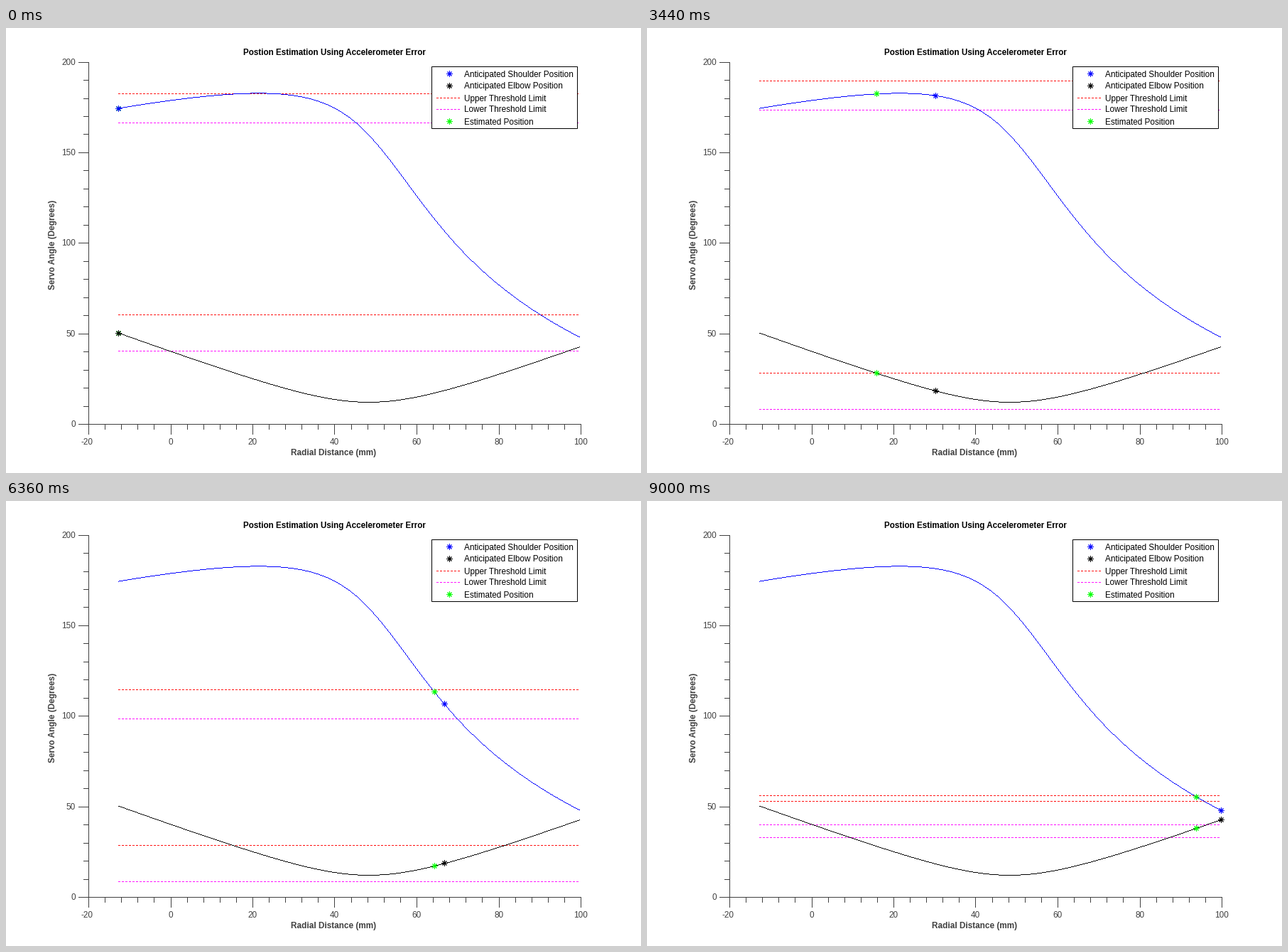
Write a matplotlib script that moves like this. It is 894 by 626 pixels and loops after 9.04 s.

```python
import numpy as np
import matplotlib.pyplot as plt
from matplotlib.animation import FuncAnimation
from matplotlib.patches import Rectangle

W, H, DPI = 894, 626, 64
PX = 72 / DPI  # points per pixel
FRAMES, INTERVAL = 226, 40
X0, Y0 = 116, 557
GREY = "#404040"
BLUE, RED, MAGENTA, GREEN = "#0000ff", "#ff0000", "#ff00ff", "#00ff00"

plt.rcParams["font.family"] = "Liberation Sans"


def px(mm):
    return X0 + (mm + 20) * 5.775


def py(deg):
    return Y0 - deg * 2.547


def shoulder_angle(mm, upper=62, fore=80, height=24.1):
    """Two-link arm: direction to the hand plus the inner shoulder angle."""
    d = mm - 48.3
    r = np.hypot(d, height)
    inner = np.arccos((r**2 + upper**2 - fore**2) / (2 * upper * r))
    return 28.45 + np.degrees(inner - np.arctan(d / height))


def elbow_angle(mm, bend=18.3):
    return 12.2 + 0.842 * (np.hypot(mm - 48.3, bend) - bend)


radial = -12.7 + 0.5 * np.arange(FRAMES)
shoulder, elbow = shoulder_angle(radial), elbow_angle(radial)

fig = plt.figure(figsize=(W / DPI, H / DPI), dpi=DPI, facecolor="white")
ax = fig.add_axes([0, 0, 1, 1])
ax.set_xlim(0, W)
ax.set_ylim(H, 0)
ax.axis("off")


def line(x, y, color, z=1, **kw):
    return ax.plot(x, y, color=color, lw=PX, zorder=z, **kw)[0]


def dashed(x, y, color, z=2):
    return line(x, [y + 0.5] * 2, color, z, ls=(0, (3, 2)),
                dash_capstyle="butt", snap=False)


def star(x, y, color, z=5):
    return line([x], [y], color, z, marker=(8, 2, 0), ms=8 * PX, mew=PX,
                ls="none")


def curve(x, y, color):
    """Hard-edged curve, one pixel per step along its longer direction."""
    s = np.cumsum(np.maximum(abs(np.diff(x)), abs(np.diff(y))))
    s = np.insert(s, 0, 0)
    steps = np.arange(0, s[-1])
    cols, rows = (np.round(np.interp(steps, s, v)) for v in (x, y))
    ax.hlines(rows + 0.5, cols, cols + 1, color=color, lw=PX, zorder=3,
              snap=False)


def label(x, y, s, size=11.75, color="black", va="baseline", **kw):
    ax.text(x, y, s, fontsize=size * PX, color=color, va=va, zorder=11, **kw)


# Axes and ticks
line([X0, X0], [round(py(200)), Y0], GREY)
line([X0, round(px(100))], [Y0, Y0], GREY)
for deg in range(0, 201, 10):
    major = deg % 50 == 0
    y = round(py(deg))
    line([X0 - (14 if major else 7), X0], [y, y], GREY)
    if major:
        label(98, y + 4, str(deg), color=GREY, ha="right")
for mm in range(-20, 101, 4):
    major = mm % 20 == 0
    x = round(px(mm))
    line([x, x], [Y0, Y0 + (14 if major else 7)], GREY)
    if major:
        label(x - (2 if mm < 0 else 0), 585.5, str(mm), color=GREY,
              ha="center")

label(462, 38, "Postion Estimation Using Accelerometer Error", 11.65,
      ha="center", weight="bold")
label(461, 600.5, "Radial Distance (mm)", color=GREY, ha="center",
      weight="bold")
label(66.5, 305, "Servo Angle (Degrees)", color=GREY, weight="bold",
      rotation=90, ha="center", va="center")

curve(px(radial), py(shoulder), BLUE)
curve(px(radial), py(elbow), "black")

# Legend
ax.add_patch(Rectangle((599, 54), 205, 87, fc="white", ec="black", lw=PX,
                       zorder=9))
ROWS = [("Anticipated Shoulder Position", BLUE, star),
        ("Anticipated Elbow Position", "black", star),
        ("Upper Threshold Limit", RED, dashed),
        ("Lower Threshold Limit", MAGENTA, dashed),
        ("Estimated Position", GREEN, star)]
for row, (name, color, mark) in enumerate(ROWS):
    y = round(64.3 + 16.7 * row)
    mark(624 if mark is star else [606, 641], y, color, 10)
    label(645, y + 4.5, name)

# Moving parts: profile, tolerance, limits, estimate, anticipated
SPAN = [158, 806]
tracks = []
for profile, tol, color in ((shoulder, 8, BLUE), (elbow, 10, "black")):
    limits = [(tol, dashed(SPAN, 0, RED)), (-tol, dashed(SPAN, 0, MAGENTA))]
    tracks.append((profile, tol, limits, star(0, 0, GREEN),
                   star(0, 0, color, 6)))


def update(i):
    # The estimate is the first place where both angles are within limits
    inside = np.ones(FRAMES, bool)
    for profile, tol, *_ in tracks:
        inside &= np.abs(profile - profile[i]) <= tol + 0.05
    k = int(np.argmax(inside))
    for profile, _, limits, estimate, anticipated in tracks:
        for offset, limit in limits:
            limit.set_ydata([round(py(profile[i] + offset)) + 0.5] * 2)
        for marker, j in ((estimate, k), (anticipated, i)):
            marker.set_data([round(px(radial[j]))], [round(py(profile[j]))])
    return []


anim = FuncAnimation(fig, update, frames=FRAMES, interval=INTERVAL,
                     repeat=True, repeat_delay=0, blit=False)
plt.show()
```
